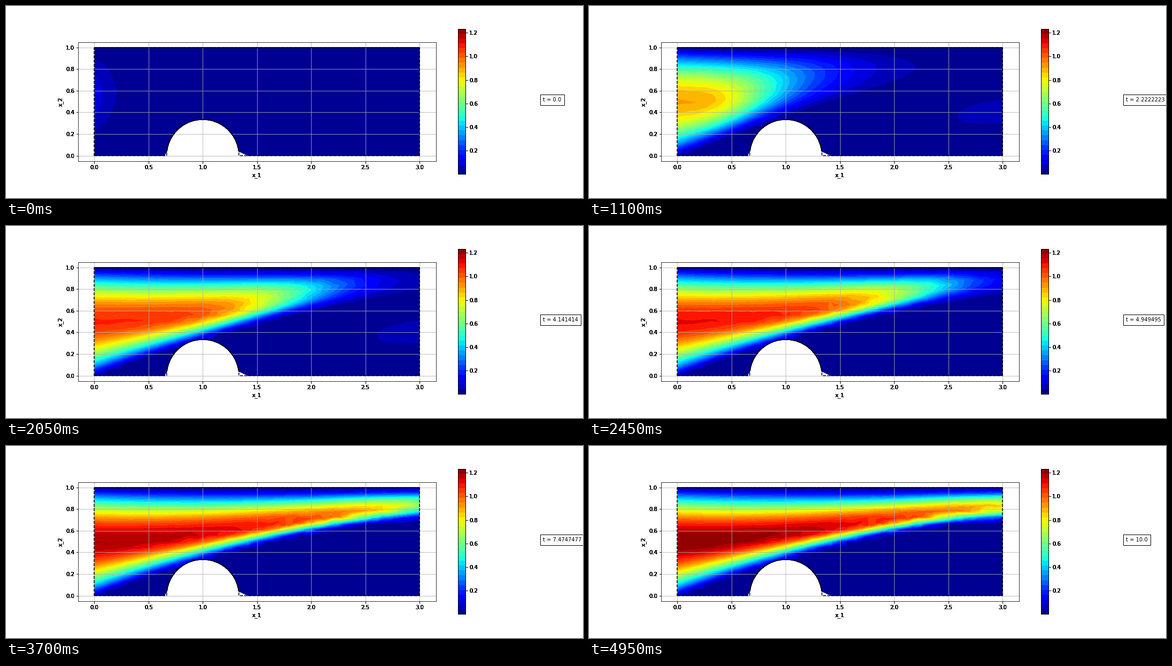
Animation of 1080 by 360 pixels, one loop 5000 ms. Source, as a matplotlib script:

```python
import numpy as np
import matplotlib.pyplot as plt
from matplotlib.animation import FuncAnimation
from matplotlib.tri import Triangulation

FRAMES = 100
LOOP_MS = 5000
TIMES = np.linspace(0, 10, FRAMES, dtype=np.float32)
W, H = 1080, 360
V_MAX = 1.232
BANDS = 30
RADIUS = 1 / 3
ARC_GAP = 0.12

plt.rcParams["font.family"] = "DejaVu Sans"
plt.rcParams["font.size"] = 10


def build_mesh(h=0.055):
    """Jittered triangle mesh of the channel with a half disc cut out."""
    rng = np.random.default_rng(4)
    xs = np.linspace(0, 3, round(3 / h) + 1)
    ys = np.linspace(0, 1, round(1 / h) + 1)
    gx, gy = (g.ravel() for g in np.meshgrid(xs, ys))
    inner_x = (gx > 0) & (gx < 3)
    inner_y = (gy > 0) & (gy < 1)
    gx = gx + inner_x * inner_y * rng.uniform(-0.25, 0.25, gx.size) * h
    gy = gy + inner_x * inner_y * rng.uniform(-0.25, 0.25, gy.size) * h
    keep = np.hypot(gx - 1, gy) > RADIUS + 0.03
    keep &= ~((gy == 0) & (gx > 0.62) & (gx < 1.44))
    a = np.linspace(ARC_GAP, np.pi - ARC_GAP, 18)
    px = np.concatenate([gx[keep], 1 + RADIUS * np.cos(a), [0.645, 1.42]])
    py = np.concatenate([gy[keep], RADIUS * np.sin(a), [0, 0]])
    tri = Triangulation(px, py)
    cx = px[tri.triangles].mean(axis=1)
    cy = py[tri.triangles].mean(axis=1)
    tri.set_mask(np.hypot(cx - 1, cy) < RADIUS)
    return tri


mesh = build_mesh()
X, Y = mesh.x, mesh.y

# Lower edge and ridge line of the plume along the channel
LOWER = np.polyval(np.polyfit(
    [0, 0.25, 0.5, 0.667, 1, 1.5, 2, 2.5, 3],
    [0, 0.06, 0.165, 0.24, 0.325, 0.445, 0.565, 0.645, 0.675], 4), X)
RIDGE = np.polyval(np.polyfit(
    [0, 0.5, 1, 1.5, 2, 2.5, 3],
    [0.5, 0.52, 0.57, 0.63, 0.715, 0.77, 0.82], 3), X)
DECAY = 1 - 0.033 * X**2
TILT = 1.3 * X**2 / (1 + (X / 2.4)**2)
SHARP_LOW = np.minimum(1 + 0.5 * X, 2)
SHARP_TOP = np.minimum(1 + 0.3 * X, 1.6)


def field(t):
    inflow = 1.384 * (t + 0.1) / (t + 1.317)
    start = np.exp(-3 * t)
    low = LOWER + 0.12 * start
    ridge = RIDGE + 0.05 * start

    rise = np.clip((Y - low) / (ridge - low), 0, 1)
    fall = np.clip((1 - Y) / (1 - ridge), 0, 1)
    profile = np.where(Y < ridge,
                       np.sin(np.pi / 2 * rise)**SHARP_LOW,
                       np.sin(np.pi / 2 * fall)**SHARP_TOP)

    reach = np.interp(t, [0, 1.11, 3.33, 4.95, 6.57, 8.48, 10],
                      [0.15, 0.37, 1.38, 2.28, 3.05, 3.8, 4.5])
    dist = np.maximum(X - TILT * (Y - ridge), 0)
    front = 1 / (1 + (dist / reach)**(1.2 + 2.5 * reach))

    # Faint patch near the outlet
    patch = 0.07 * np.exp(-((t - 3.1) / 2.6)**2 - ((X - 3) / 0.66)**2
                          - ((Y - 0.36 - 0.1 * (X - 2.5)) / 0.164)**2)
    return inflow * DECAY * profile * front + patch


def overdraw(artist, times=8):
    """Paint an artist repeatedly so that its soft edges turn solid."""
    draw = artist.draw

    def repeat(renderer):
        for _ in range(times):
            draw(renderer)

    artist.draw = repeat


def harden(axis):
    overdraw(axis.label)
    for tick in axis.get_major_ticks():
        for part in (tick.tick1line, tick.tick2line, tick.label1, tick.label2):
            if part.get_visible():
                overdraw(part)


fig = plt.figure(figsize=(W / 72, H / 72), dpi=72, facecolor="white")

ax = fig.add_axes([0.125, 0.125, 0.62, 0.755])
ax.set_aspect("equal")
ax.set_xlim(-0.15, 3.15)
ax.set_ylim(-0.05, 1.05)
ax.set_xticks(np.arange(7) / 2)
ax.set_yticks(np.arange(6) / 5)
ax.set_xlabel("x_1")
ax.set_ylabel("x_2")
ax.grid(True)

# Domain border
angle = np.linspace(np.pi, 0, 120)
arc_x, arc_y = 1 + RADIUS * np.cos(angle), RADIUS * np.sin(angle)
floor_x = np.concatenate([[0], arc_x, [3]])
floor_y = np.concatenate([[0], arc_y, [0]])
for bx, by in ((floor_x, floor_y), ([0, 0], [0, 1]),
               ([0, 3], [1, 1]), ([3, 3], [0, 1])):
    ax.plot(bx, by, "k--", lw=1.5)
solid = (angle > ARC_GAP) & (angle < np.pi - ARC_GAP)
ax.plot(arc_x[solid], arc_y[solid], "k-", lw=1.5)
ax.plot([0, 3], [1, 1], "k-", lw=0.9)

# Colour scale
colors = plt.get_cmap("jet")((np.arange(BANDS) + 0.5) / BANDS)
levels = np.linspace(0, V_MAX, BANDS + 1)
levels[0], levels[-1] = -1, 2

cax = fig.add_axes([846.45 / W, 45 / H, 13.59 / W, 271.8 / H])
cax.imshow(colors[:, None, :], origin="lower", aspect="auto",
           interpolation="nearest", extent=(0, 1, 0, V_MAX))
cax.set_xticks([])
cax.yaxis.tick_right()
cax.set_yticks(np.arange(1, 7) / 5)
for spine in cax.spines.values():
    overdraw(spine, 4)

for axis in (ax.xaxis, ax.yaxis, cax.yaxis):
    harden(axis)

clock = ax.text(1.3, 0.5, "", transform=ax.transAxes,
                bbox={"facecolor": "white", "pad": 5})
shown = []


def update(i):
    while shown:
        shown.pop().remove()
    shown.append(ax.tricontourf(mesh, field(float(TIMES[i])),
                                levels=levels, colors=colors))
    ax.set_xlim(-0.15, 3.15)
    ax.set_ylim(-0.05, 1.05)
    clock.set_text("t = " + str(TIMES[i]))
    return [clock]


anim = FuncAnimation(fig, update, frames=FRAMES, interval=LOOP_MS / FRAMES,
                     repeat=True, repeat_delay=0, blit=False)
plt.show()
```
